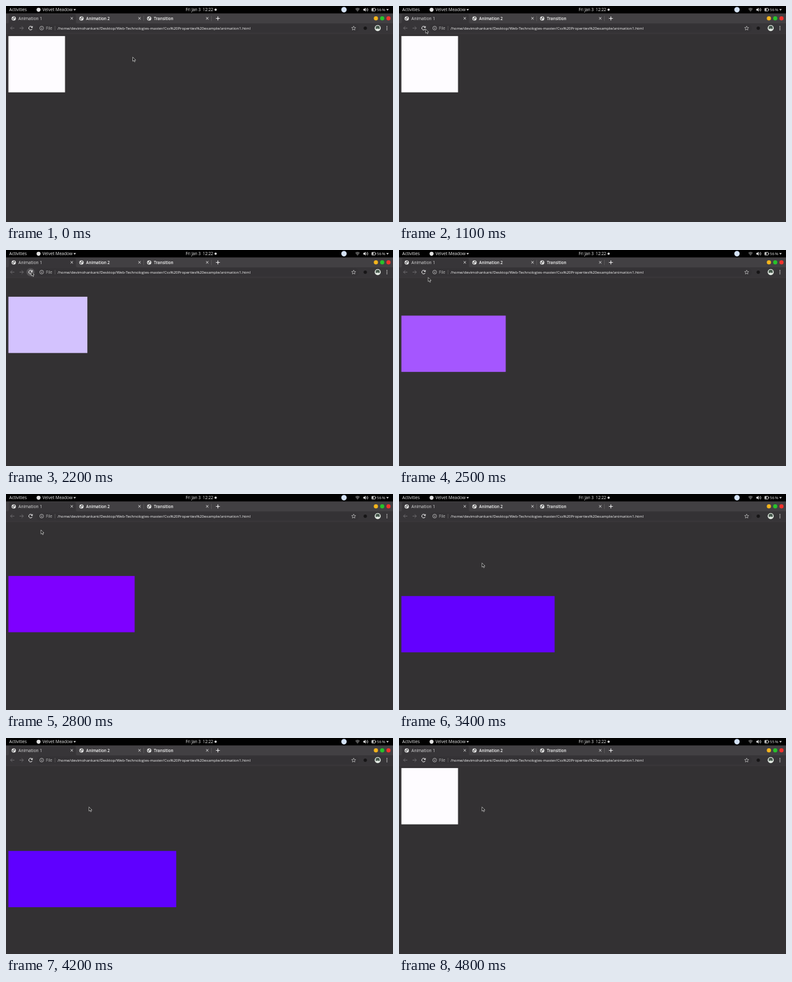
Recreate the animation shown at these times as an HTML page. Size 600 by 337 pixels, loop 5600 ms.

```html
<!DOCTYPE html>
<html lang="en">
<head>
<meta charset="utf-8">
<title>Animation 1</title>
<style>
html, body { margin: 0; height: 100%; overflow: hidden; background: #333133; }
svg { display: block; width: 100vw; height: 100vh; }
text { font: 500 6.5px "Open Sans", "Noto Sans", sans-serif; fill: #ececec; }
.bar { font-size: 6.6px; }
.tab { font-weight: 600; font-size: 6.25px; fill: #f8f8f8; }
.line { fill: none; stroke: #d8d8d8; stroke-width: .8; }
</style>
</head>
<body>
<svg viewBox="0 0 600 337" preserveAspectRatio="none">
  <defs>
    <g id="globe">
      <circle r="3.3" fill="#e4e4e4"/>
      <path d="M-2.5-.9L-.5.6-.3 2.5-1.6 1.7zM.2-2.5L2-1.2.9.2-.6-.9z" fill="#444"/>
    </g>
    <path id="close" d="M-1.8-1.8L1.8 1.8M1.8-1.8L-1.8 1.8" stroke="#ddd" stroke-width=".9"/>
    <path id="down" d="M-2-1H2L0 1.4z" fill="#ddd"/>
  </defs>

  <rect width="600" height="337" fill="#333133"/>
  <rect id="box" x="3.7" width="87.8" height="87.8"/>

  <!-- desktop bar -->
  <rect width="600" height="11.7" fill="#010101"/>
  <text class="bar" x="5" y="8.2">Activities</text>
  <circle cx="50.5" cy="5.8" r="3.1" fill="#e2e2e2"/>
  <text class="bar" x="56.5" y="8.2">Velvet Meadow</text>
  <use href="#down" x="106.5" y="5.8"/>
  <text x="278.5" y="8.2" style="font-size:6.3px">Fri Jan 3&#160; 12:22</text>
  <circle cx="325" cy="5.8" r="1.7" fill="#f0f0f0"/>
  <circle cx="524" cy="5.8" r="4.2" fill="#d3e1f7"/>
  <path d="M541.3 4.2Q545 1.2 548.7 4.2L545 9z" fill="#555"/>
  <path d="M554 4.6h1.5l2-1.8v6l-2-1.8H554z" fill="#e0e0e0"/>
  <path class="line" d="M558.8 4.2q1.3 1.6 0 3.2M560.3 3.2q2 2.6 0 5.2"/>
  <rect class="line" x="567" y="3.6" width="5.6" height="4.4" rx=".6"/>
  <path d="M567.4 4h2.2v3.6h-2.2zM572.8 5h.9v1.6h-.9z" fill="#ddd"/>
  <text id="charge" x="575" y="8.1" style="font-size:6px"></text>
  <use href="#down" x="591.5" y="5.8"/>

  <!-- tab strip -->
  <rect y="11.7" width="600" height="15.3" fill="#424043"/>
  <path d="M2 27q2.5 0 2.5-2.5V15q0-2.3 2.3-2.3H106q2.3 0 2.3 2.3v9.5q0 2.5 2.5 2.5z" fill="#373538"/>
  <use href="#globe" x="12" y="19.5"/>
  <use href="#globe" x="117" y="19.5"/>
  <use href="#globe" x="222" y="19.5"/>
  <text x="19.3" y="21.8" style="fill:#dcdcdc">Animation 1</text>
  <text class="tab" x="124.3" y="21.8">Animation 2</text>
  <text class="tab" x="229.3" y="21.8">Transition</text>
  <use href="#close" x="102" y="19.3"/>
  <use href="#close" x="207" y="19.3"/>
  <use href="#close" x="312" y="19.3"/>
  <path d="M213.5 15.5v8M318.5 15.5v8" stroke="#6a686b" stroke-width=".5"/>
  <path d="M325.5 19.4h6M328.5 16.4v6" stroke="#eee"/>
  <circle cx="573.5" cy="19.3" r="3.2" fill="#f5b51c"/>
  <circle cx="583.3" cy="19.3" r="3.2" fill="#27c32b"/>
  <circle cx="593" cy="19.3" r="3.2" fill="#f2322c"/>

  <!-- toolbar -->
  <rect y="27" width="600" height="16" fill="#373538"/>
  <rect x="47" y="28.5" width="500" height="12.5" rx="6.2" fill="#343235"/>
  <path d="M0 43.2H600" stroke="#403e41" stroke-width=".5"/>
  <path class="line" d="M13 34.5H7M9.8 31.7L7 34.5l2.8 2.8M21 34.5h6M24.2 31.7l2.8 2.8-2.8 2.8" style="stroke:#747275"/>
  <circle id="hover" cx="38" cy="34.5" r="6.3" fill="#545255"/>
  <path d="M40.2 32.6a2.8 2.8 0 1 0 .5 2.9" fill="none" stroke="#eee"/>
  <path d="M41.3 31v3h-3z" fill="#eee"/>
  <circle class="line" cx="55.3" cy="34.5" r="2.9" style="stroke-width:.7"/>
  <path d="M55.3 34v2M55.3 32.7v.6" stroke="#ddd" stroke-width=".7"/>
  <text x="62" y="36.8" style="font-size:6.2px;fill:#b8b8b8">File</text>
  <path d="M76 31v7" stroke="#777" stroke-width=".5"/>
  <text x="80" y="36.8" style="font-size:5.98px;fill:#f4f4f4">/home/devimohankant/Desktop/Web-Technologies-master/Css%20Properties%20example/animation1.html</text>
  <path class="line" d="M539 31.4l.9 2.1 2.3.2-1.7 1.5.5 2.3-2-1.2-2 1.2.5-2.3-1.7-1.5 2.3-.2z" style="stroke-width:.6"/>
  <circle cx="557" cy="34.6" r="2.6" fill="#161516"/>
  <circle cx="576.3" cy="34.5" r="4.7" fill="#e4ebe4"/>
  <circle cx="576.3" cy="34" r="3.2" fill="#46584c"/>
  <path d="M573.2 37.2q.4-2 3.1-2t3.1 2q-3.1 2.4-6.2 0z" fill="#e4ebe4"/>
  <g fill="#ddd"><circle cx="590.6" cy="32" r=".8"/><circle cx="590.6" cy="34.5" r=".8"/><circle cx="590.6" cy="37" r=".8"/></g>

  <path id="cursor" d="M0 0V6.4L1.5 5.1 2.6 7.5 3.7 7 2.7 4.7H4.6z" fill="#111" stroke="#eee" stroke-width=".6"/>
</svg>
<script>
const $ = id => document.getElementById(id);
const LOOP = 5600, STEP = 100, START = 1733, LENGTH = 3000;

// time, x, y of the pointer tip
const pointer = [
  [100, 196.5, 79.7], [700, 46, 46], [1100, 41.3, 36], [1300, 39.2, 34],
  [2300, 39.2, 34], [2800, 54.2, 56], [2900, 90, 82], [3100, 128.7, 107.6]
];
// progress, red, green, blue of the box
const colors = [
  [0, 254, 252, 255], [.2, 210, 193, 254], [.6, 128, 0, 255], [.84, 99, 0, 255], [1, 94, 0, 255]
];

// linear interpolation between rows whose first value is the key
function sample(rows, key) {
  const i = rows.findIndex(row => row[0] > key);
  if (i === 0) return rows[0].slice(1);
  if (i < 0) return rows[rows.length - 1].slice(1);
  const a = rows[i - 1], b = rows[i], k = (key - a[0]) / (b[0] - a[0]);
  return a.slice(1).map((v, j) => v + (b[j + 1] - v) * k);
}

// cubic-bezier(.25, .1, .25, 1)
function ease(x) {
  const curve = (s, p, q) => 3 * s * (1 - s) ** 2 * p + 3 * s * s * (1 - s) * q + s ** 3;
  let lo = 0, hi = 1;
  for (let i = 0; i < 24; i++) {
    const mid = (lo + hi) / 2;
    if (curve(mid, .25, .25) < x) lo = mid; else hi = mid;
  }
  return curve(lo, .1, 1);
}

function draw(now) {
  const t = Math.floor(now % LOOP / STEP) * STEP;
  const x = (t - START) / LENGTH;
  const p = x > 0 && x < 1 ? ease(x) : 0;
  const box = $("box");
  box.setAttribute("y", 46.9 + 131.8 * p);
  box.setAttribute("width", 87.8 + 175.7 * p);
  box.setAttribute("fill", `rgb(${sample(colors, p).map(Math.round)})`);
  $("cursor").setAttribute("transform", `translate(${sample(pointer, t)})`);
  $("hover").setAttribute("opacity", t >= 1800 && t < 2400 ? 1 : 0);
  $("charge").textContent = (t < 4400 ? 56 : 55) + "\u2009%";
}

const begin = performance.now();
function tick() {
  draw(performance.now() - begin);
  requestAnimationFrame(tick);
}
tick();
</script>
</body>
</html>
```
